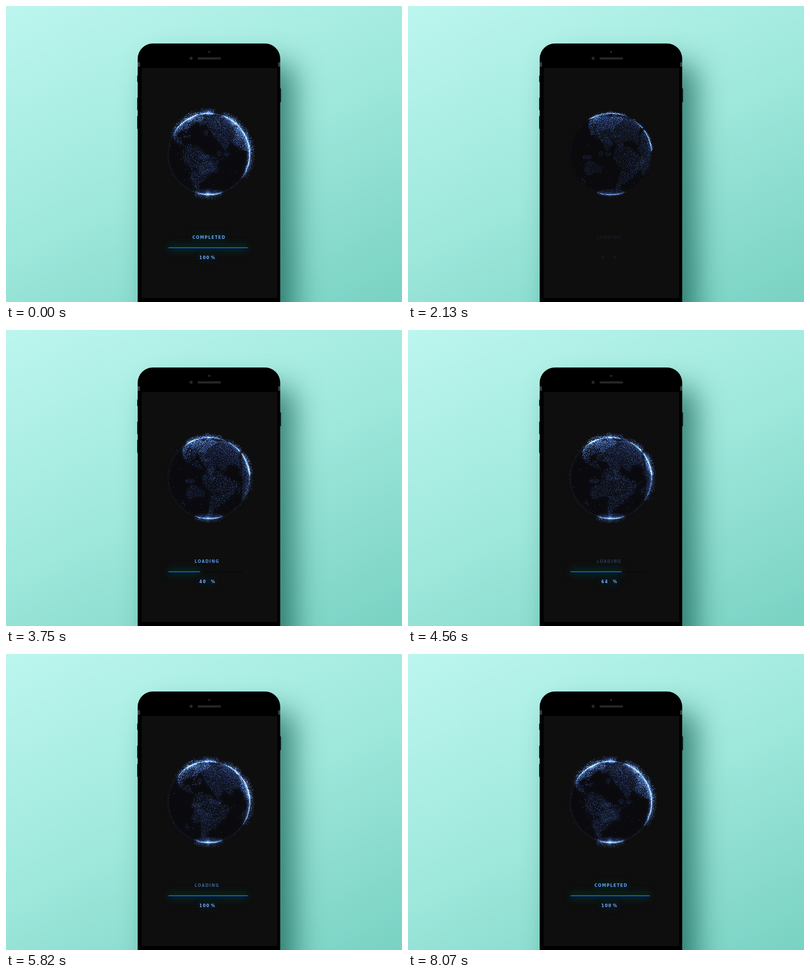
Animation of 800x600 px, one loop 8.1 s. Source, as an HTML page with a canvas:

```html
<!DOCTYPE html>
<html lang="en">
<head>
<meta charset="utf-8">
<title>Globe loader</title>
<style>
  html, body { margin: 0; width: 100%; height: 100%; overflow: hidden; }
  #stage {
    position: relative; width: 800px; height: 600px; overflow: hidden;
    background: linear-gradient(155deg, #bcf6ee 0%, #9fe8dc 50%, #79d2c3 100%);
  }
  #phone {
    position: absolute; left: 266px; top: 76px; width: 288px; height: 640px;
    border-radius: 31px; background: #000;
    box-shadow: 29px 40px 56px rgba(0, 76, 64, .64);
  }
  svg, canvas { position: absolute; left: 0; top: 0; }
  #globe { left: 300px; top: 190px; }
  text {
    font: bold 8px "DejaVu Sans", sans-serif; letter-spacing: 1.4px; fill: #64a0f2;
  }
  #percent text { letter-spacing: 1.6px; fill: #7aacff; }
</style>
</head>
<body>
<div id="stage">
  <div id="phone"></div>
  <svg width="800" height="600" viewBox="0 0 800 600">
    <defs>
      <filter id="soft" x="300" y="440" width="220" height="100" filterUnits="userSpaceOnUse">
        <feGaussianBlur stdDeviation="7"/>
      </filter>
    </defs>
    <g fill="#04100e">
      <rect x="265" y="141" width="3" height="13"/>
      <rect x="265" y="186" width="3" height="25"/>
      <rect x="265" y="223" width="3" height="26"/>
      <rect x="553" y="167" width="2.5" height="28"/>
    </g>
    <g fill="#3b4342">
      <rect x="266" y="114" width="4.5" height="9"/>
      <rect x="550" y="114" width="4" height="9"/>
    </g>
    <rect x="274" y="126" width="274" height="466" fill="#0e0e0e"/>
    <g fill="#262626">
      <circle cx="374" cy="106" r="3.2"/>
      <circle cx="410.5" cy="93" r="2.2"/>
      <rect x="387" y="104" width="47.5" height="4.5" rx="2.2"/>
    </g>
    <g id="panel">
      <rect x="328" y="489.5" width="160" height="1" fill="#060606"/>
      <rect x="484" y="489.5" width="4.5" height="1" fill="#1d1d1d"/>
      <rect id="barGlow" x="328" y="482" width="0" height="16" fill="#06302f" opacity=".6" filter="url(#soft)"/>
      <rect id="bar" x="328" y="489" width="0" height="2" rx="1" fill="#0a5cf0"/>
      <text id="loading" x="381" y="472">LOADING</text>
      <g id="done">
        <rect x="378" y="463" width="64" height="12" fill="#06302f" opacity=".5" filter="url(#soft)"/>
        <text x="376.5" y="472">COMPLETED</text>
      </g>
      <g id="percent">
        <rect x="392" y="504" width="30" height="12" fill="#06283a" opacity=".5" filter="url(#soft)"/>
        <text id="count" x="390.5" y="513"></text>
        <text x="414" y="513">%</text>
      </g>
    </g>
  </svg>
  <canvas id="globe" width="220" height="220"></canvas>
</div>
<script>
const LOOP = 8100, STEP = 30;
const RAD = Math.PI / 180, MID = 110;
const R = 81, CAMERA = 400, RIM = R / Math.sqrt(1 - (R / CAMERA) ** 2);
const $ = id => document.getElementById(id);
const ctx = $('globe').getContext('2d');

let seed = 20177;
function rnd() {
  seed = (seed + 0x6D2B79F5) | 0;
  let v = Math.imul(seed ^ (seed >>> 15), 1 | seed);
  v = (v + Math.imul(v ^ (v >>> 7), 61 | v)) ^ v;
  return ((v ^ (v >>> 14)) >>> 0) / 4294967296;
}

// Land tests: coarse outlines in longitude, latitude pairs.
const outline = (...p) => (lon, lat) => {
  let hit = false;
  for (let i = 0, j = p.length - 2; i < p.length; j = i, i += 2) {
    if ((p[i + 1] > lat) !== (p[j + 1] > lat) &&
        lon < (p[j] - p[i]) * (lat - p[i + 1]) / (p[j + 1] - p[i + 1]) + p[i]) hit = !hit;
  }
  return hit;
};
const island = (lon0, lat0, w, h) => (lon, lat) =>
  ((lon - lon0) / w) ** 2 + ((lat - lat0) / h) ** 2 < 1;

const northAmerica = outline(-166,66, -156,71, -95,72, -82,68, -94,59, -82,54, -78,62, -64,59,
  -55,51, -75,38, -81,26, -84,30, -97,27, -96,18, -88,21, -78,8, -105,20, -124,40, -135,58, -163,56);
const southAmerica = outline(-78,8, -72,12, -60,8, -50,0, -35,-6, -39,-16, -48,-27, -65,-42,
  -67,-55, -75,-50, -71,-18, -81,-5);
const africa = outline(-6,35, 10,37, 32,31, 43,11, 51,11, 40,-4, 40,-16, 32,-28, 19,-35,
  12,-17, 9,4, -8,5, -17,15);
const eurasia = outline(-9,37, -9,43, 8,54, 5,60, 25,71, 70,73, 105,77, 180,69, 157,52, 140,54,
  122,30, 107,10, 103,2, 92,22, 79,9, 72,21, 57,22, 45,13, 35,33, 26,38, 15,42);
const australia = outline(114,-23, 131,-12, 142,-12, 153,-27, 148,-38, 131,-32, 115,-34);
const lands = [
  northAmerica, southAmerica, africa, eurasia, australia,
  island(-41, 72, 17, 11), island(-85, 77, 24, 5), island(-70, 68, 9, 5),
  island(-3, 54, 4, 5), island(-19, 65, 5, 2), island(-77, 21, 7, 1.6),
  island(47, -19, 3, 7), island(114, 1, 5, 5), island(102, 0, 5, 4),
  island(140, -5, 9, 4), island(138, 37, 4, 6), island(172, -42, 4, 5),
  (lon, lat) => lat < -70
];

const COUNT = 30000, dots = [];
for (let i = 0; i < COUNT; i++) {
  const lat = Math.asin(1 - 2 * (i + rnd()) / COUNT);
  const lon = ((i * 137.508 + rnd() * 1.6) % 360) - 180;
  const lum = .12 + .88 * rnd() ** 2, lift = .13 * rnd() ** 5;
  if (lands.some(inside => inside(lon, lat / RAD)) || rnd() < .004) {
    dots.push({ lon: lon * RAD, cos: Math.cos(lat), y: Math.sin(lat), lum, lift });
  }
}

const clamp = v => Math.max(0, Math.min(1, v));
const ramp = (t, a, b) => clamp((t - a) / (b - a));
function keyed(t, keys) {
  for (let i = 1; i < keys.length; i++) {
    const [t0, v0] = keys[i - 1], [t1, v1] = keys[i];
    if (t <= t1) return v0 + (v1 - v0) * ramp(t, t0, t1);
  }
  return keys[keys.length - 1][1];
}
const FADE = [[30, 0], [700, .3], [1290, .62], [2400, .88], [3500, 1]];
const HALO = [[1290, 0], [2910, .6], [4560, .85], [6500, 1]];

const BINS = 120, rim = new Float32Array(BINS);

function flare(x, y, rx, ry, alpha) {
  ctx.save();
  ctx.translate(x, y);
  ctx.scale(rx, ry);
  const g = ctx.createRadialGradient(0, 0, 0, 0, 0, 1);
  g.addColorStop(0, '#a8c8ff');
  g.addColorStop(.3, 'rgba(86,134,245,.6)');
  g.addColorStop(1, 'rgba(50,90,220,0)');
  ctx.globalAlpha = alpha;
  ctx.fillStyle = g;
  ctx.fillRect(-1, -1, 2, 2);
  ctx.restore();
}

function arc(from, to, width, alpha) {
  ctx.globalAlpha = alpha;
  ctx.lineWidth = width;
  ctx.beginPath();
  ctx.arc(MID, MID, RIM - .5, from, to);
  ctx.stroke();
}

function drawRim(fade, halo) {
  ctx.strokeStyle = '#6f9cf5';
  arc(0, 2 * Math.PI, 3, .05 * halo);
  const size = 2 * Math.PI / BINS;
  for (let i = 0; i < BINS; i++) {
    const near = (rim[(i + BINS - 1) % BINS] + 2 * rim[i] + rim[(i + 1) % BINS]) / 4;
    const level = clamp(near / 90) ** 1.4 * fade;
    const a = i * size;
    arc(a, a + size, 1.2, level * (.08 + .36 * halo));
    arc(a, a + size, 5, level * .12 * halo);
  }
}

function drawGlobe(t) {
  const fade = keyed(t, FADE), halo = keyed(t, HALO);
  const turn = (-48 - (8070 - t) * .0059) * RAD;
  ctx.globalCompositeOperation = 'source-over';
  ctx.globalAlpha = 1;
  ctx.clearRect(0, 0, 220, 220);
  ctx.globalAlpha = fade;
  ctx.fillStyle = 'rgba(10,10,15,.6)';
  ctx.beginPath();
  ctx.arc(MID, MID, RIM, 0, 2 * Math.PI);
  ctx.fill();

  ctx.globalCompositeOperation = 'lighter';
  ctx.fillStyle = '#5a8bf8';
  rim.fill(0);
  for (const d of dots) {
    const a = d.lon - turn;
    const x = d.cos * Math.sin(a), z = d.cos * Math.cos(a);
    const zoom = R * CAMERA / (CAMERA - R * z);
    const edge = Math.hypot(x, d.y) * zoom / RIM;
    if (edge > .94) {
      const turns = Math.atan2(-d.y, x) / (2 * Math.PI) + 1;
      rim[Math.floor(turns * BINS) % BINS]++;
    }
    const scale = zoom * (1 + d.lift * halo);
    const shade = (z > 0 ? 1 : .5) * (.75 + .2 * edge ** 4) * (.92 + .3 * d.y);
    ctx.globalAlpha = clamp(d.lum * shade * fade);
    ctx.fillRect(Math.round(MID + x * scale - .5), Math.round(MID - d.y * scale - .5), 1, 1);
  }
  drawRim(fade, halo);

  // Polar highlights
  const glow = fade * (.3 + .7 * halo);
  const capEnd = 132 - 12 * ramp(t, 2400, 7600);
  ctx.save();
  ctx.beginPath();
  ctx.rect(0, 0, capEnd, 60);
  ctx.clip();
  flare(108, 27, 30, 4, .45 * glow);
  flare(108, 26, 9, 10, .4 * glow * halo);
  ctx.restore();
  flare(109, 191, 29, 4, .5 * glow);
  flare(108, 191, 6, 12, .45 * glow * halo);

  ctx.globalAlpha = .42 * halo;
  ctx.filter = 'blur(3px)';
  ctx.drawImage(ctx.canvas, 0, 0);
  ctx.filter = 'none';
}

function drawPanel(t) {
  const load = ramp(t, 2430, 5730);
  const pulse = .6 - .3 * Math.cos((t - 2900) / 1650 * 2 * Math.PI);
  $('panel').setAttribute('opacity', ramp(t, 2100, 2430));
  $('bar').setAttribute('width', 160.5 * load);
  $('barGlow').setAttribute('width', 160.5 * load);
  $('count').textContent = Math.floor(load * 100);
  $('loading').setAttribute('opacity', pulse * (1 - ramp(t, 6050, 6250)));
  $('done').setAttribute('opacity', ramp(t, 6250, 6600));
}

const start = performance.now();
let shown = -1;
function frame() {
  const now = Math.max(0, performance.now() - start) % LOOP;
  const t = Math.floor(now / STEP) * STEP;
  if (t !== shown) {
    shown = t;
    // The loop opens on the finished pose, then cuts to the empty screen.
    const pose = t < STEP ? LOOP - STEP : t;
    drawGlobe(pose);
    drawPanel(pose);
  }
  requestAnimationFrame(frame);
}
frame();
</script>
</body>
</html>
```
